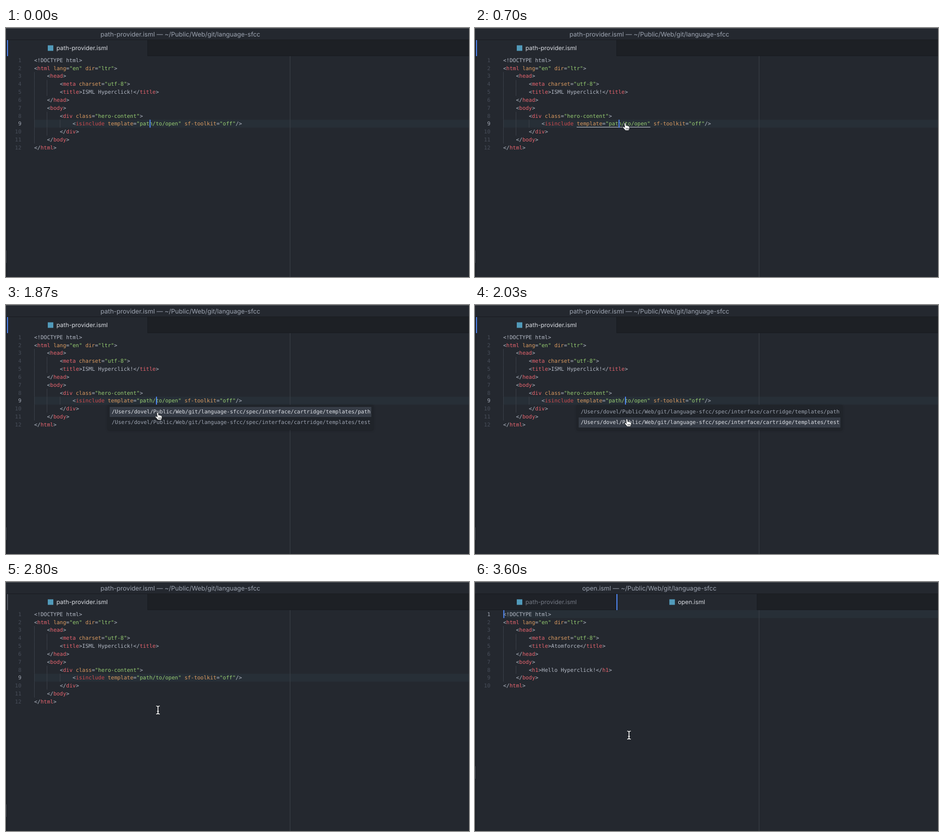
Write an HTML page that moves like this. It is 920 px wide and 496 px high and loops after 3.63 s.

```html
<!DOCTYPE html>
<html lang="en">
<head>
<meta charset="utf-8">
<title>Path provider</title>
<style>
  html, body { margin: 0; width: 100%; height: 100%; overflow: hidden; background: #24282f; }
  svg { display: block; width: 920px; height: 496px; }
  text { white-space: pre; text-rendering: geometricPrecision; }
  .code { font: 10.56px "DejaVu Sans Mono", monospace; fill: #b4bac6; }
  .ui { font: 11.85px Inter, sans-serif; }
  .title { font-size: 12.55px; fill: #9da4b1; text-anchor: middle; }
  .tag { fill: #e8656f; }
  .include { fill: #cf4b4e; }
  .attr { fill: #db9b60; }
  .str { fill: #98cf72; }
</style>
</head>
<body>
<svg id="stage" viewBox="0 0 920 496"></svg>
<script>
const LOOP = 3630, COL = 6.36, ROW = 15.83, LEFT = 56, TOP = 56;
const BLUE = '#4f87f5', GREY = '#555a62', BG = '#24282f';
const LINK = 600, CLICK = 1000, PICK = 2500, OPEN = 3120;

const stage = document.getElementById('stage');

function add(parent, name, attrs = {}, content) {
  const el = document.createElementNS('http://www.w3.org/2000/svg', name);
  set(el, attrs);
  if (content !== undefined) el.textContent = content;
  parent.appendChild(el);
  return el;
}
function set(el, attrs) {
  for (const key in attrs) el.setAttribute(key, attrs[key]);
}
const group = parent => add(parent, 'g');
const rect = (parent, x, y, width, height, fill) =>
  add(parent, 'rect', { x, y, width, height, fill });
const label = (parent, cls, x, y, str, extra) =>
  add(parent, 'text', { class: cls, x, y, ...extra }, str);
const show = (el, on) => el.setAttribute('visibility', on ? 'visible' : 'hidden');

function codeLine(parent, line, row) {
  const indent = line.search(/\S/);
  const text = label(parent, 'code', LEFT + indent * COL, 67.7 + row * ROW, '');
  const parts = line.trim().split(/("[^"]*"|[\w-]+(?==)|(?<=<\/?)\w+)/);
  parts.forEach((part, i) => {
    if (!part) return;
    let cls = '';
    if (i % 2) {
      if (part[0] === '"') cls = 'str';
      else if (parts[i + 1][0] === '=') cls = 'attr';
      else cls = part === 'isinclude' ? 'include' : 'tag';
    }
    add(text, 'tspan', { class: cls }, part);
  });
}

// One editor view: current line, indent guides, line numbers and code
function editor(lines, current, title) {
  const view = group(stage);
  rect(view, LEFT, TOP + current * ROW, 920 - LEFT, ROW, '#272f37');
  rect(view, 564, TOP, 1, 440, '#3b4048');
  lines.forEach((line, row) => {
    const indent = line.search(/\S/);
    for (let c = 0; c < indent; c += 4)
      rect(view, Math.round(LEFT + c * COL), TOP + row * ROW, 1, ROW + 0.1, '#3a3f48');
    label(view, 'code', 30.5, 67.7 + row * ROW, row + 1, {
      'text-anchor': 'end',
      style: `fill:${row === current ? '#a3a9b5' : '#484e5a'}`
    });
    codeLine(view, line, row);
  });
  label(view, 'ui title', 346.5, 17, title + ' — ~/Public/Web/git/language-sfcc');
  return view;
}

function tab(parent, x, name, active) {
  rect(parent, x, 24, 279, active ? 32 : 31, active ? BG : '#1f2228');
  rect(parent, x + 279, 24, 1, 32, '#181b20');
  const center = x + 149.2, half = name.length > 10 ? 51.7 : 27.5;
  rect(parent, center - half - 16.5, 34.5, 11, 11, '#519aba');
  label(parent, 'ui', center, 44.4, name, {
    'text-anchor': 'middle', fill: active ? '#d9dce2' : '#737883'
  });
}

// Window frame
rect(stage, 0, 0, 920, 496, BG);
rect(stage, 0, 0, 920, 1, '#565a60');
rect(stage, 0, 23, 920, 1, '#181b20');
rect(stage, 0, 24, 920, 31, '#1d2025');
rect(stage, 0, 55, 920, 1, '#181b20');
rect(stage, 1, 24, 1, 472, '#181b20');
const thumb = rect(stage, 0, 443, 1, 25, '#4a4f58');

const first = editor([
  '<!DOCTYPE html>',
  '<html lang="en" dir="ltr">',
  '    <head>',
  '        <meta charset="utf-8">',
  '        <title>ISML Hyperclick!</title>',
  '    </head>',
  '    <body>',
  '        <div class="hero-content">',
  '            <isinclude template="path/to/open" sf-toolkit="off"/>',
  '        </div>',
  '    </body>',
  '</html>'
], 8, 'path-provider.isml');
tab(first, 2, 'path-provider.isml', true);

const second = editor([
  '<!DOCTYPE html>',
  '<html lang="en" dir="ltr">',
  '    <head>',
  '        <meta charset="utf-8">',
  '        <title>Atomforce</title>',
  '    </head>',
  '    <body>',
  '        <h1>Hello Hyperclick!</h1>',
  '    </body>',
  '</html>'
], 0, 'open.isml');
tab(second, 2, 'path-provider.isml', false);
tab(second, 281, 'open.isml', true);

const marker = rect(stage, 2, 24, 2, 32, BLUE);
const underline = rect(stage, 202, 197, 146.5, 1, '#ccd0d8');
const caret = rect(stage, 0, 0, 2, ROW, BLUE);

// Suggestion list
const popup = group(stage);
add(popup, 'rect', {
  x: 202, y: 199, width: 528, height: 50, rx: 3, fill: '#20242a',
  style: 'filter:drop-shadow(0 1px 2px rgba(0,0,0,.25))'
});
const pick = rect(popup, 206, 203, 520, 20, '#363c46');
const base = '/Users/dovel/Public/Web/git/language-sfcc/spec/interface/cartridge/templates/';
const items = ['path', 'test'].map((end, i) =>
  label(popup, 'code', 210, 216.3 + i * 21, base + end));

// Mouse pointers, both with the hot spot at 0,0
const mouse = group(stage);
const beam = group(mouse);
const beamPath = 'M-3.5-8Q-.8-8 0-6.5Q.8-8 3.5-8M0-6.5V6.5' +
  'M-3.5 8Q-.8 8 0 6.5Q.8 8 3.5 8M-1.8 2.5H1.8';
for (const [stroke, width] of [['#15181c', 3.2], ['#fff', 1.6]])
  add(beam, 'path', { d: beamPath, fill: 'none', stroke, 'stroke-width': width });
const hand = add(mouse, 'path', {
  d: 'M-1.5 1Q0-1 1.5 1L2.2 5.5Q3.5 4.6 4.3 5.9Q6 5.2 6.6 6.6Q8.4 6 8.8 7.8' +
     'L9 10.5Q8 13 7.5 15H.8Q-.8 12.4-4.2 9.2Q-4.5 7-2.3 7.7L-.4 9.2Z' +
     'M2.3 10V13M4.4 10V13M6.4 10V13',
  fill: '#fff', stroke: '#15181c', 'stroke-width': 0.8, 'stroke-linejoin': 'round'
});

// time, x, y
const path = [
  [40, 421, 390], [540, 299, 191], [600, 298, 189], [1400, 298, 189],
  [1800, 301, 213], [1880, 301, 214], [2030, 301.5, 227],
  [2640, 302, 229], [2800, 302, 255], [3190, 306, 305]
];
function mouseAt(t) {
  const i = path.findIndex(p => p[0] > t);
  if (i < 0) return path[path.length - 1].slice(1);
  const a = path[Math.max(i - 1, 0)], b = path[i];
  const u = i ? (t - a[0]) / (b[0] - a[0]) : 0;
  const e = u * u * (3 - 2 * u);
  return [a[1] + (b[1] - a[1]) * e, a[2] + (b[2] - a[2]) * e];
}

function caretOn(t) {
  if (t >= OPEN) return true;
  if (t >= PICK) return false;
  if (t >= CLICK) return t < 1450 || (t >= 1850 && t < 2250);
  return t < 200 || t >= 600;
}

function render(t) {
  const opened = t >= OPEN, listed = t >= CLICK && t < PICK;
  const linked = t >= LINK && t < CLICK;
  const [x, y] = mouseAt(t);

  show(first, !opened);
  show(second, opened);
  set(thumb, { y: opened ? 367 : 443 });
  set(marker, {
    x: opened ? 281 : 2,
    fill: t >= PICK && !opened ? GREY : BLUE
  });
  show(underline, linked);

  const col = opened ? 0 : t < CLICK ? 36 : 38;
  set(caret, { x: LEFT + col * COL + 0.3, y: TOP + (opened ? 0 : 8) * ROW });
  show(caret, caretOn(t));

  show(popup, listed);
  const chosen = y > 223 ? 1 : 0;
  set(pick, { y: 203 + chosen * 21 });
  items.forEach((item, i) => {
    item.style.fill = i === chosen ? '#dfe2e8' : '#9da4b1';
  });

  const pointing = linked || (listed && y > 200);
  set(mouse, { transform: `translate(${x} ${y})` });
  show(beam, t >= 40 && !pointing);
  show(hand, pointing);
}

function tick(now) {
  render(now % LOOP);
  requestAnimationFrame(tick);
}
render(0);
requestAnimationFrame(tick);
</script>
</body>
</html>
```
